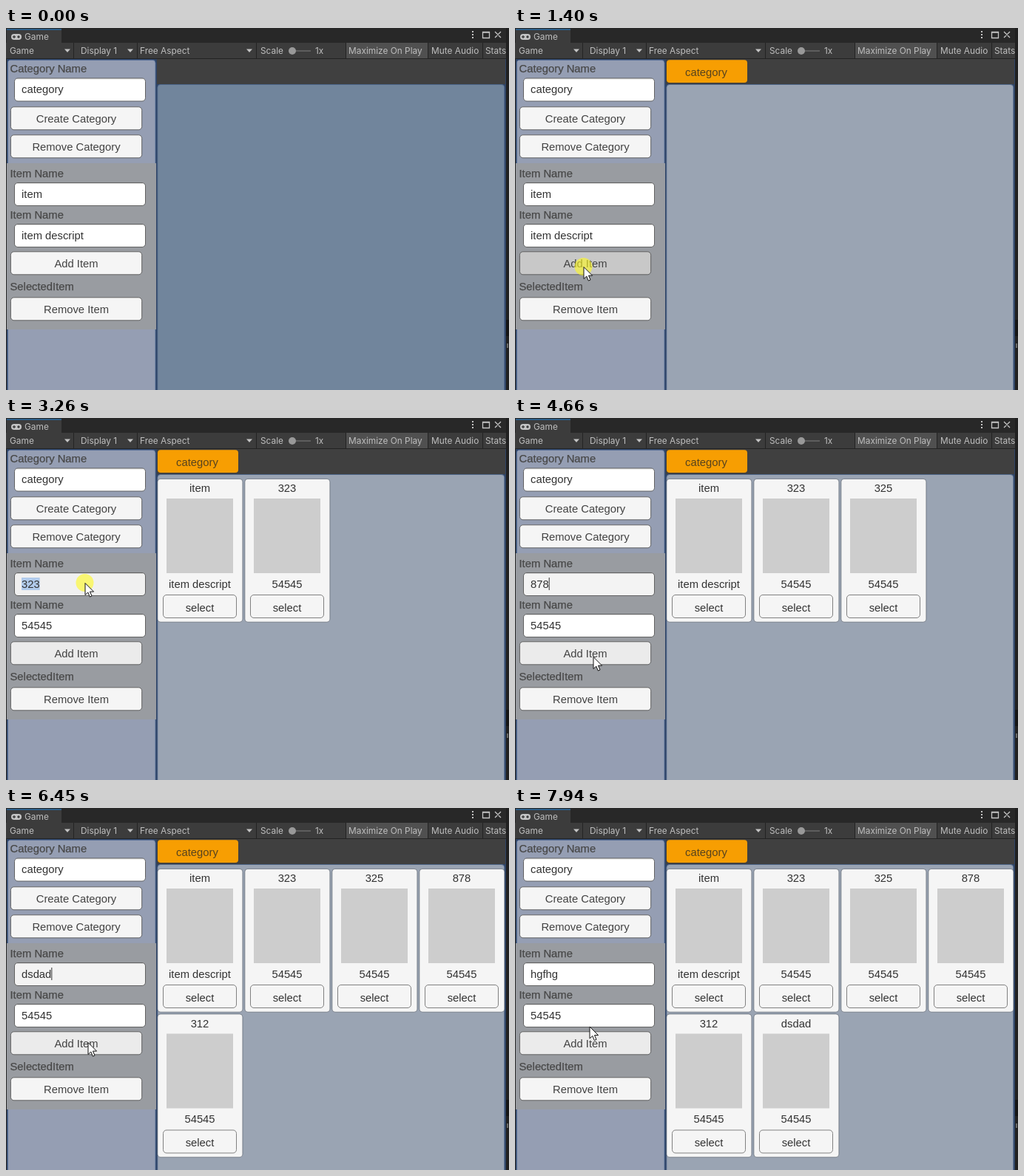
An HTML page for the animation above (8 s loop, 680x490 px).

```html
<!DOCTYPE html>
<html lang="en">
<head>
<meta charset="utf-8">
<title>Category editor</title>
<style>
html, body { margin: 0; width: 100%; height: 100%; overflow: hidden; background: #282828; }
svg { display: block; }
text { font: 14.8px "Liberation Sans", Arial, sans-serif; fill: #323232; white-space: pre; }
.bar text { font: 11.88px Inter, sans-serif; fill: #bebebe; }
.label { fill: #484848; stroke: #484848; stroke-width: .25; }
.mid { text-anchor: middle; }
.soft { fill: #424242; }
.box { stroke: #565656; stroke-width: .9; }
.thin { stroke: #747474; stroke-width: .9; }
</style>
</head>
<body>
<svg id="stage" width="680" height="490" viewBox="0 0 680 490"></svg>
<script>
const LOOP = 8000, STEP = 77.7;
const stage = document.getElementById('stage');

const rect = (x, y, w, h, fill, extra = '') =>
  `<rect x="${x}" y="${y}" width="${w}" height="${h}" fill="${fill}" ${extra}/>`;
const text = (x, y, s, cls = '') => `<text x="${x}" y="${y}" class="${cls}">${s}</text>`;
const button = (id, y, s) =>
  rect(6.4, y + .8, 177.3, 31, '#f5f5f5', `id="${id}" class="box" rx="4.5"`) +
  text(95, y + 21.8, s, 'mid soft');
const field = (id, y, s) =>
  rect(11.5, y + .5, 177, 31, '#fff', `id="${id}Box" class="box" rx="4.5"`) +
  `<path d="M15 ${y + 1.5}H185" stroke="#000" opacity=".12"/>` +
  rect(21, y + 7, 0, 17, '#b1cbec', `id="${id}Sel"`) +
  `<text id="${id}" x="21" y="${y + 20.8}">${s}</text>` +
  rect(0, y + 7, 1, 17, '#323232', `id="${id}Caret" visibility="hidden"`);

function card(index, title, note) {
  const x = 205 + index % 4 * 118, y = 82 + Math.floor(index / 4) * 196.5;
  return `<g class="card" visibility="hidden" transform="translate(${x} ${y})">` +
    rect(-.1, .4, 115, 193.8, '#f5f5f5', 'rx="4" stroke="#444c58" stroke-width=".8" stroke-opacity=".7"') +
    text(57, 18, title, 'mid') + rect(12, 27, 90, 101, '#cdcdcd') +
    text(57, 147.8, note, 'mid') +
    rect(7.5, 157.5, 99, 31, '#f5f5f5', 'class="thin" rx="4.5"') +
    text(57, 179.6, 'select', 'mid') + '</g>';
}

function toolbar() {
  const seps = [91, 177, 338, 459, 570, 644].map(x => rect(x, 20, 1, 21, '#232323')).join('');
  const arrows = [83, 168, 329].map(x => `<path d="M${x - 4} 28.5h8l-4 4.5z" fill="#c4c4c4"/>`).join('');
  const words = [[5, 'Game'], [101, 'Display 1'], [181, 'Free Aspect'], [344, 'Scale'], [418, '1x'],
    [463, 'Maximize On Play'], [575, 'Mute Audio'], [648, 'Stats']];
  return '<g class="bar">' + rect(0, 0, 680, 20, '#282828') + rect(1, 1, 74, 19, '#3c3c3c') +
    rect(1, 1, 74, 2, '#2c5d87') + rect(0, 20, 676, 21, '#3c3c3c') + rect(460, 20, 110, 21, '#505050') +
    seps + arrows + words.map(([x, s]) => text(x, 35, s)).join('') + text(25, 16, 'Game') +
    rect(7, 8, 14, 8, '#c4c4c4', 'rx="4"') +
    '<path d="M9 12h4M11 10v4" stroke="#3c3c3c" stroke-width="1.3"/><circle cx="17" cy="12" r="1.7" fill="#3c3c3c"/>' +
    '<path d="M387 31h25" stroke="#5e5e5e" stroke-width="2"/><circle cx="387" cy="31" r="5" fill="#999"/>' +
    [5, 9, 13].map(y => rect(630, y - 1, 2, 2, '#c4c4c4')).join('') +
    '<path d="M644.5 5.5h9v8h-9zM644 6h10M661 5l8 8M669 5l-8 8" fill="none" stroke="#c4c4c4" stroke-width="1.3"/>' +
    rect(676, 0, 4, 490, '#202020') + '</g>';
}

const titles = ['item', '323', '325', '878', '312', 'dsdad'];
stage.innerHTML = rect(0, 0, 680, 490, '#282828') + toolbar() +
  rect(0, 41, 676, 449, '#2f4466') + rect(0, 41, 676, 1, '#232323') +
  rect(0, 41, 1, 449, '#282828') +
  rect(204, 42, 471, 34, '#404040') +
  rect(2.3, 43.3, 199.8, 452, '#959eb3', 'rx="4" stroke="#45618f" stroke-width=".8"') +
  rect(1, 183, 202, 225, '#999ca1') +
  rect(204.8, 76.5, 469, 420, '#71859c', 'id="panel" rx="4" stroke="#4a6288" stroke-width=".8"') +
  rect(676, 395, 4, 22, '#141414') + rect(677, 427, 2, 6, '#6a6a6a') +
  text(5.5, 60.3, 'Category Name', 'label') + field('category', 67.5, 'category') +
  button('create', 106, 'Create Category') + button('remove', 144, 'Remove Category') +
  text(5.5, 202.3, 'Item Name', 'label') + field('name', 209, 'item') +
  text(5.5, 258.3, 'Item Name', 'label') + field('note', 265, 'item descript') +
  button('add', 302, 'Add Item') + text(5.5, 355.3, 'SelectedItem', 'label') +
  button('drop', 364, 'Remove Item') +
  '<g id="tab">' + rect(205, 43.3, 109, 30.7, '#f79e02', 'rx="4"') +
  '<text x="258.5" y="65" class="mid" style="fill:#57431f">category</text></g>' +
  titles.map((s, i) => card(i, s, i ? '54545' : 'item descript')).join('') +
  '<circle id="ring" r="12" fill="#fffa1e" opacity=".6"/>' +
  '<path id="cursor" d="M0 0V16L3.8 12.5L6.3 18.6L9 17.4L6.5 11.6H11.6Z" fill="#fff" stroke="#111" stroke-width="1"/>';

const $ = id => document.getElementById(id);
const cards = [...document.querySelectorAll('.card')];
const show = (el, on) => el.setAttribute('visibility', on ? 'visible' : 'hidden');
const paint = (id, fill) => $(id).setAttribute('fill', fill);

// Times below count ticks of STEP ms.
const path = [[1, 2, 119], [3, 37, 119], [10, 37, 119], [16, 92, 322], [18, 93, 323], [20, 95, 310],
  [21, 98, 301], [22, 106, 226], [25, 107, 226], [27, 107, 294], [28, 107, 296], [29, 107, 283],
  [34, 107, 284], [36, 104, 314], [39, 104, 314], [41, 107, 226], [42, 107, 223], [46, 107, 223],
  [48, 106, 325], [51, 106, 325], [53, 107, 226], [57, 107, 225], [60, 106, 323], [63, 106, 322],
  [65, 107, 226], [70, 107, 226], [72, 108, 322], [75, 108, 322], [77, 108, 226], [80, 108, 226],
  [83, 111, 317], [86, 111, 317], [88, 108, 226], [94, 108, 226], [97, 104, 334], [99, 104, 334],
  [102, 101, 295.5]];
const createAt = 5, submitAt = 99;
const addAt = [17, 37, 49, 61, 73, 84];
// [press, first key, typed word, focus lost]
const nameEdits = [[22, 24, '323', 29], [42, 45, '325', 49], [54, 56, '878', 61],
  [66, 68, '312', 73], [77, 79, 'dsdad', 84], [89, 91, 'hgfhg', submitAt]];
const noteEdits = [[29, 31, '54545', 37]];
const presses = [createAt, ...addAt, ...[...nameEdits, ...noteEdits].map(e => e[0])];
const held = (n, p) => n === p || n === p + 1;

function cursorAt(n) {
  const i = path.findIndex(p => p[0] >= n);
  if (i <= 0) return path[i < 0 ? path.length - 1 : 0].slice(1);
  const [a, b] = [path[i - 1], path[i]], k = (n - a[0]) / (b[0] - a[0]);
  return [1, 2].map(j => a[j] + (b[j] - a[j]) * k);
}

function drawField(id, n, first, edits, hover) {
  let value = first, active = null;
  for (const e of edits) {
    if (n >= e[1]) value = e[2].slice(0, n - e[1] + 1);
    if (n >= e[0] && n < e[3]) active = e;
  }
  const el = $(id), selected = active && n < active[1];
  el.textContent = value;
  const width = el.getComputedTextLength();
  $(id + 'Sel').setAttribute('width', selected ? width : 0);
  $(id + 'Caret').setAttribute('x', 21 + width);
  show($(id + 'Caret'), active && !selected);
  paint(id + 'Box', !active ? (hover ? '#f5f5f5' : '#fff') :
    n === active[0] ? '#f0f0f0' : n === active[0] + 1 ? '#c8c8c8' : '#f3f3f3');
}

function pressFill(n, press, lit) {
  return n === press ? '#dcdcdc' : n === press + 1 ? '#c8c8c8' : lit ? '#ebebeb' : '#f5f5f5';
}

function draw(n) {
  const [x, y] = cursorAt(n);
  $('cursor').setAttribute('transform', `translate(${x} ${y + .5})`);
  $('ring').setAttribute('cx', x - .5);
  $('ring').setAttribute('cy', y);
  show($('cursor'), n > 0);
  show($('ring'), presses.some(p => held(n, p)));

  show($('tab'), n >= createAt + 2);
  paint('panel', n >= createAt + 2 ? '#9aa4b3' : '#71859c');
  cards.forEach((el, i) => show(el, n >= addAt[i] + 2));

  drawField('name', n, 'item', nameEdits, y > 209 && y < 241);
  drawField('note', n, 'item descript', noteEdits, y > 265 && y < 295);

  const last = addAt.filter(p => p <= n).pop() ?? -9;
  const left = [...nameEdits, ...noteEdits].some(e => e[0] > last && e[0] < n);
  const chosen = last > 0 && !left || n >= submitAt;
  paint('add', pressFill(n, last, chosen || y > 302 && y < 334));
  paint('create', pressFill(n, createAt, n > createAt && n < addAt[0]));
}

const start = performance.now();
function tick() {
  const t = Math.max(0, performance.now() - start) % LOOP;
  draw(Math.min(102, Math.floor(t / STEP + .1)));
  requestAnimationFrame(tick);
}
tick();
</script>
</body>
</html>
```
